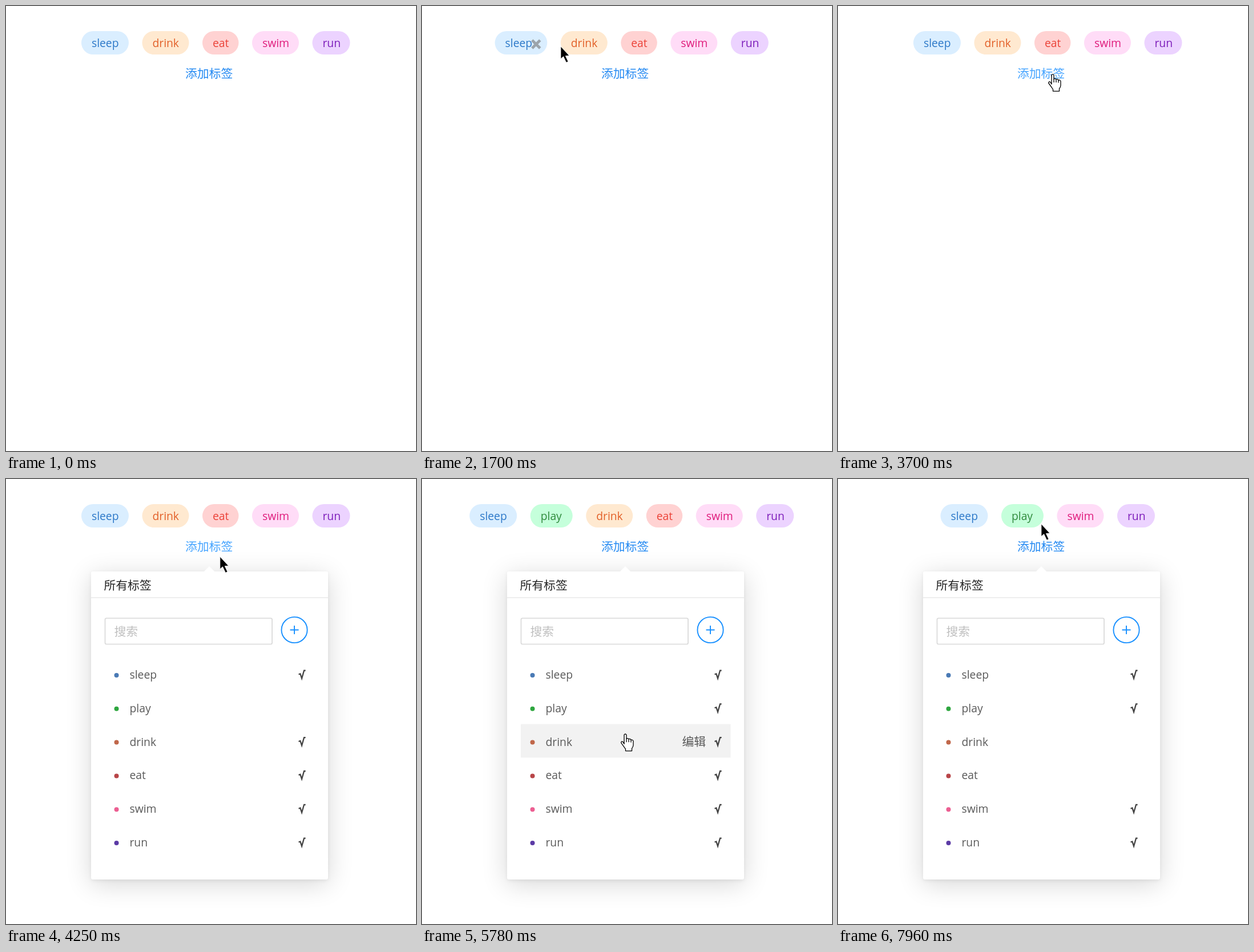
These frames come from a looping animation (718x780 px, 8000 ms). An HTML page:

```html
<!DOCTYPE html>
<html lang="zh">
<head>
<meta charset="utf-8">
<title>Tags</title>
<style>
html, body { margin: 0; width: 100%; height: 100%; overflow: hidden; background: #fff; }
svg { display: block; position: absolute; left: 0; top: 0; }
text { font: 19.3px "Open Sans", "Noto Sans", sans-serif; }
.zh { font: 350 20.8px "Noto Sans CJK SC", "Noto Sans CJK", sans-serif; }
#panel { position: absolute; left: 149px; top: 162px; width: 415px; height: 540px; border-radius: 3px;
  background: #fff; transform-origin: 207px -9px;
  box-shadow: 0 8px 45px rgba(0,0,0,.16), 0 2px 6px rgba(0,0,0,.07); }
#panel svg { left: -149px; top: -162px; }
</style>
</head>
<body>
<svg id="top" width="718" height="780">
  <g id="tags"></g>
  <text id="link" class="zh" x="314" y="126">添加标签</text>
</svg>
<div id="panel">
  <svg width="718" height="780">
    <path d="M346 163L356 153L366 163Z" fill="#fff"/>
    <text class="zh" x="171.5" y="193.5" fill="#262626">所有标签</text>
    <path d="M149 208H564" stroke="#e8e8e8" stroke-width="1.6"/>
    <rect id="field" x="173.5" y="244" width="292.5" height="45.5" rx="2.5" fill="#fff" stroke-width="1.7"/>
    <text class="zh" x="189.5" y="275" fill="#bfbfbf">搜索</text>
    <g fill="none" stroke="#1890ff" stroke-width="1.9">
      <circle cx="505" cy="264.5" r="22.6"/>
      <path d="M497.5 264.5H512.5M505 257V272"/>
    </g>
    <g id="rows"></g>
  </svg>
</div>
<svg width="718" height="780">
  <g id="cursor">
    <path d="M0 0V21.5L4.6 17.5L9.6 28L13 26.4L8.3 16.4L14.8 16Z" fill="#000" stroke="#fff" stroke-width=".7"/>
    <g transform="translate(-8)" fill="#fff" stroke="#000" stroke-width="1.3" stroke-linejoin="round">
      <path d="M6 18V2Q8 -.6 10 2V9Q12 7.5 14 9.5Q16.5 8.3 18 11Q21 10 22 13V20Q22 23 19.5 26V30.3H8.5V27Q5 22 .7 16Q1 12.4 4 14.5Z"/>
      <path d="M10 9V15M14 10V15M18 11V15.5"/>
    </g>
    <path d="M-4 -12Q0 -12 0 -9Q0 -12 4 -12M0 -9V9M-4 12Q0 12 0 9Q0 12 4 12" fill="none" stroke="#000" stroke-width="1.5"/>
  </g>
</svg>
<script>
const LOOP = 8000, STEP = 77.25, ROW_H = 58.8, ROWS_TOP = 312;
const $ = id => document.getElementById(id);

function el(parent, name, attrs, text) {
  const node = document.createElementNS('http://www.w3.org/2000/svg', name);
  for (const key in attrs) node.setAttribute(key, attrs[key]);
  if (text) node.textContent = text;
  return parent.appendChild(node);
}

// hover: [start, end]; shown: [start, end]
const tags = [
  { name: 'sleep', w: 83, bg: '#daeeff', ink: '#2c78c8', dot: '#4a7ab5', hover: [1000, 1660], shown: [0, LOOP] },
  { name: 'play', w: 74, bg: '#c5ffdb', ink: '#2f8a3c', dot: '#2ea63f', shown: [5310, LOOP] },
  { name: 'drink', w: 82, bg: '#ffe9d0', ink: '#e25f28', dot: '#c0674a', hover: [1700, 2430], shown: [0, 6250] },
  { name: 'eat', w: 63.5, bg: '#ffd2d2', ink: '#eb4238', dot: '#b84548', hover: [2470, 2880], shown: [0, 6640] },
  { name: 'swim', w: 82, bg: '#ffdcf7', ink: '#df1c7c', dot: '#ec5f92', hover: [2900, 2990], shown: [0, LOOP] },
  { name: 'run', w: 66, bg: '#ecd3ff', ink: '#7c1cba', dot: '#5b3aa5', hover: [3000, 3400], shown: [0, LOOP] }
];

tags.forEach((tag, i) => {
  const g = tag.node = el($('tags'), 'g', {});
  tag.pill = el(g, 'rect', { y: 44, height: 41, rx: 20.5, fill: tag.bg });
  el(g, 'text', { x: 18, y: 72.3, fill: tag.ink }, tag.name);
  tag.close = el(g, 'path', { d: 'M-7 -7L7 7M7 -7L-7 7', stroke: '#777', 'stroke-width': 4.8 });

  const row = el($('rows'), 'g', { transform: `translate(0 ${ROWS_TOP + i * ROW_H})` });
  tag.back = el(row, 'rect', { x: 173, width: 367.5, height: ROW_H, fill: '#f2f2f2' });
  el(row, 'circle', { cx: 193.5, cy: 32, r: 4, fill: tag.dot });
  el(row, 'text', { x: 216.5, y: 38, fill: '#595959' }, tag.name);
  tag.edit = el(row, 'text', { class: 'zh', x: 455.5, y: 97 - ROW_H, fill: '#595959' }, '编辑');
  tag.check = el(row, 'path', {
    d: 'M512.5 30.5L515.3 29.4L518 37.5L522 23.6H524.6', fill: 'none', stroke: '#444', 'stroke-width': 2.3
  });
});

// pointer path: time, x, y
const path = [
  [70, 0, 768], [770, 532, 80], [920, 532, 80], [1150, 197, 72], [1550, 197, 72],
  [1700, 243, 71], [2010, 285, 70], [2390, 285, 70], [2500, 345, 67], [2850, 353, 66],
  [3080, 588, 66], [3390, 588, 66], [3695, 376, 119], [4170, 376, 119], [4630, 361, 340],
  [4710, 361, 340], [4860, 360, 408], [5560, 360, 408], [5780, 355, 456], [6330, 355, 456],
  [6560, 348, 503], [7110, 348, 503], [7880, 358, 84], [7956, 356, 79]
];

const clamp = v => Math.max(0, Math.min(1, v));
const smooth = v => v * v * (3 - 2 * v);
const ramp = (t, start, ms) => smooth(clamp((t - start) / ms));
const within = (v, a, b) => v >= a && v < b;
const show = (node, on) => node.setAttribute('visibility', on ? 'inherit' : 'hidden');

function pointer(t) {
  const i = path.findIndex(p => p[0] > t);
  if (i < 0) return path[path.length - 1].slice(1);
  if (i === 0) return path[0].slice(1);
  const a = path[i - 1], b = path[i], k = smooth((t - a[0]) / (b[0] - a[0]));
  return [a[1] + (b[1] - a[1]) * k, a[2] + (b[2] - a[2]) * k];
}

function drawTags(t) {
  const gap = 23.5;
  let total = -gap;
  for (const tag of tags) {
    tag.on = within(t, ...tag.shown);
    tag.p = tag.hover ? ramp(t, tag.hover[0], 220) - ramp(t, tag.hover[1], 150) : 0;
    tag.width = tag.w + 10.5 * tag.p;
    if (tag.on) total += tag.width + gap;
  }
  let x = 367.2 - total / 2;
  for (const tag of tags) {
    show(tag.node, tag.on);
    show(tag.check, tag.on);
    if (!tag.on) continue;
    tag.node.setAttribute('transform', `translate(${x})`);
    tag.pill.setAttribute('width', tag.width);
    tag.close.setAttribute('transform', `translate(${tag.width - 19.5} 67)`);
    tag.close.setAttribute('opacity', .62 * clamp(tag.p * 1.5));
    x += tag.width + gap;
  }
}

function draw(now) {
  const t = Math.floor((now % LOOP + 10) / STEP) * STEP;
  const [x, y] = pointer(t);
  const open = ramp(t, 3790, 220);
  drawTags(t);

  const panel = $('panel').style;
  panel.opacity = open;
  panel.transform = `scale(${.8 + .2 * open})`;

  const row = open === 1 && within(x, 173, 540) ? Math.floor((y - ROWS_TOP) / ROW_H) : -1;
  tags.forEach((tag, i) => {
    show(tag.back, i === row);
    show(tag.edit, i === row);
  });

  const onField = open === 1 && within(x, 173, 467) && within(y, 243, 290);
  $('field').setAttribute('stroke', onField ? '#40a9ff' : '#d9d9d9');
  const onLink = within(x, 314, 397) && within(y, 104, 132);
  $('link').setAttribute('fill', within(t, 3600, 5310) ? '#46a4ff' : '#2389f2');

  const shape = onField ? 2 : row >= 0 || onLink ? 1 : 0;
  [...$('cursor').children].forEach((node, i) => show(node, t >= 70 && i === shape));
  $('cursor').setAttribute('transform', `translate(${x} ${y})`);
}

const start = performance.now();
(function tick() {
  draw(performance.now() - start);
  requestAnimationFrame(tick);
})();
</script>
</body>
</html>
```
